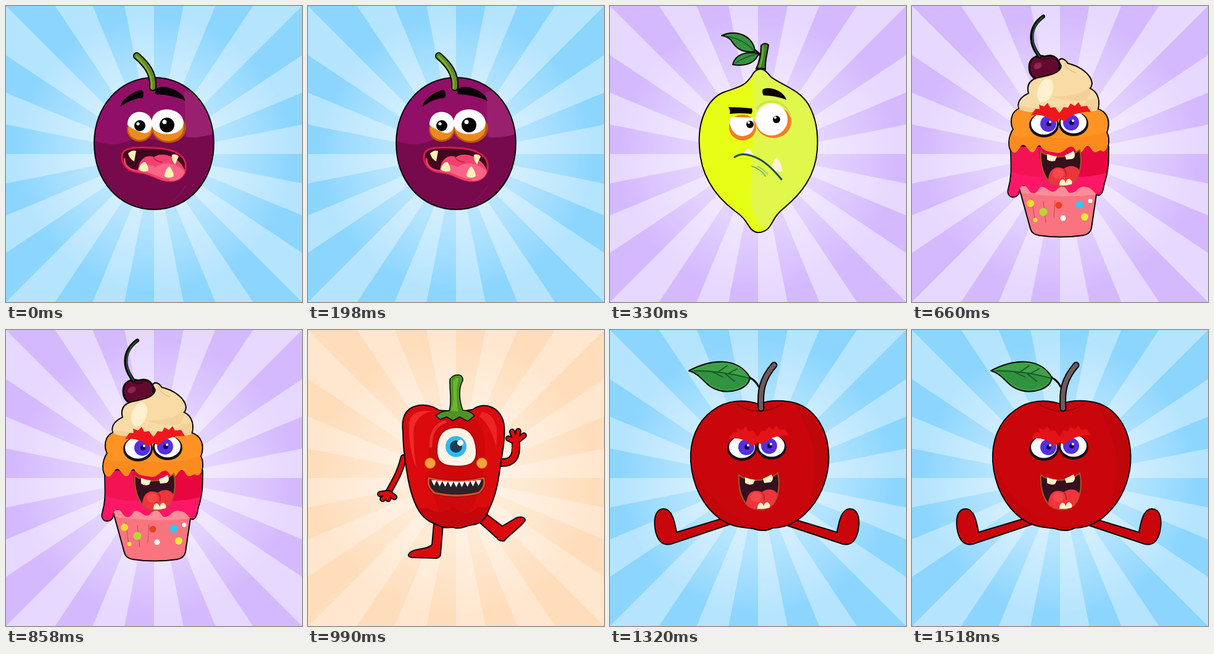
An HTML page for the animation above (1650 ms loop, 480 px wide and 480 px high).

```html
<!DOCTYPE html>
<html lang="en">
<head>
<meta charset="utf-8">
<title>Monster snacks</title>
<style>
  html, body { margin: 0; width: 100%; height: 100%; overflow: hidden; }
  svg { display: block; width: 100%; height: 100%; }
  .ink { stroke: #080406; stroke-width: 2; stroke-linejoin: round; stroke-linecap: round; }
</style>
</head>
<body>
<svg id="stage" viewBox="0 0 480 480"></svg>
<script>
const STEP = 330;
const stage = document.getElementById('stage');

const shape = (d, fill, extra = '') => `<path d="${d}" fill="${fill}" ${extra}/>`;
const inked = (d, fill, width = 2) => shape(d, fill, `class="ink" style="stroke-width:${width}"`);
const line = (d, color, width, cap = 'round') =>
  shape(d, 'none', `stroke="${color}" stroke-width="${width}" stroke-linecap="${cap}" stroke-linejoin="round"`);
const tube = (d, color, width, rim = 2) => line(d, '#080406', width + rim * 2) + line(d, color, width);
const oval = (x, y, rx, ry, fill, extra = '') =>
  `<ellipse cx="${x}" cy="${y}" rx="${rx}" ry="${ry}" fill="${fill}" ${extra}/>`;
const dot = (x, y, r, fill, extra) => oval(x, y, r, r, fill, extra);
const clipped = (id, d, content) =>
  `<clipPath id="${id}"><path d="${d}"/></clipPath><g clip-path="url(#${id})">${content}</g>`;

// Sixteen wedges, every second 11.25 degree sector
function wedges() {
  const point = i => {
    const a = i * Math.PI / 16;
    return `${240 + 400 * Math.cos(a)} ${240 + 400 * Math.sin(a)}`;
  };
  let d = '';
  for (let i = 0; i < 32; i += 2) d += `M240 240L${point(i)}L${point(i + 1)}Z`;
  return d;
}
const rays = wedges();
const backdrop = (dark, light) =>
  `<rect width="480" height="480" fill="${light}"/>${shape(rays, dark)}
   <rect width="480" height="480" fill="url(#glow)"/>`;
const blue = backdrop('#8bd5ff', '#b5e4ff');
const violet = backdrop('#d4b9ff', '#e7d8ff');
const peach = backdrop('#ffddba', '#ffe7cf');

function plum() {
  const body = 'M240 116C296 116 337 163 337 222C337 284 296 330 240 330C184 330 143 284 143 222C143 163 184 116 240 116Z';
  const mouth = 'M189 239C194 228 215 229 240 230C267 231 288 239 291 255C294 274 282 285 264 284C246 283 235 271 216 270C198 269 184 256 189 239Z';
  const shade = 'M140 217C172 230 196 225 215 208C246 224 274 218 288 212Q314 216 340 206V335H140Z';
  return shape(body, '#910f67')
    + clipped('plum', body,
        shape('M288 140C293 170 288 190 294 217Q320 217 340 207V130Z', '#99206f')
        + shape(shade, '#770a4c')
        + line('M268 318Q284 306 292 290', '#8d1760', 1))
    + inked(body, 'none')
    + tube('M238 132C240 109 227 94 212 81', '#5d8c20', 8)
    + line('M236 133C238 111 225 95 212 82', '#7fac2e', 3)
    + shape('M186 163C185 155 204 138 220 136Q225 141 222 149Q203 150 186 163Z', '#080406')
    + shape('M243 143C239 136 245 131 254 131C273 132 289 143 291 154Q270 144 243 143Z', '#080406')
    + oval(217, 200, 21, 20, '#b95611') + oval(264, 198, 28, 24, '#b95611')
    + oval(217, 199, 19, 18, '#ed8a1e') + oval(263, 197, 25, 22, '#ed8a1e')
    + shape('M197 193C196 165 236 165 237 191C237 203 229 207 222 206Q207 201 197 193Z', '#fff')
    + shape('M236 190C236 159 287 162 288 190C286 207 266 209 253 207C241 204 236 198 236 190Z', '#fff')
    + dot(217, 194, 9, '#050505') + dot(214, 191, 2.6, '#fff')
    + dot(261, 193, 12, '#050505') + dot(257, 188, 3.5, '#fff')
    + shape(mouth, '#42051f', 'stroke="#d01e48" stroke-width="3"')
    + clipped('gape', mouth,
        shape('M214 275C212 252 225 239 240 245C253 235 281 244 290 266V290H214Z', '#f3416f')
        + shape('M214 275C219 258 232 254 242 261C261 249 282 257 292 272V290H214Z', '#fb6587')
        + line('M239 246Q244 253 253 253', '#c91e50', 2))
    + line('M192 248C192 267 211 267 222 269C241 273 247 282 264 282', '#ef4069', 3)
    + shape('M198 239Q204 233 211 235L208 252Q200 248 198 239Z', '#fff1ba')
    + shape('M269 241Q277 239 280 244L274 257Q268 250 269 241Z', '#fff1ba')
    + shape('M215 265Q219 252 226 253Q231 259 231 267Q222 271 215 265Z', '#fff1ba')
    + shape('M257 276Q258 264 265 260Q272 268 272 276Q264 281 257 276Z', '#fff1ba');
}

function lemon() {
  const body = 'M240 103C247 100 253 105 261 115C276 127 307 135 322 160C334 181 338 208 336 234C333 276 310 304 284 326C263 342 264 355 255 362C246 369 236 369 229 362C222 354 221 345 202 332C165 304 147 270 145 229C142 188 157 151 184 140C209 131 218 131 230 113Q234 105 240 103Z';
  return shape(body, '#e7ff17')
    + clipped('lemon', body,
        shape('M231 100H345V330Q292 348 256 370C236 351 223 322 229 286Q236 205 231 100Z', '#e0f84c'))
    + inked(body, 'none')
    + inked('M237 102C242 91 245 80 245 64Q251 58 257 63C255 78 251 89 252 103Q244 99 237 102Z', '#417d28')
    + line('M248 66C249 80 245 91 243 99', '#67a63a', 3)
    + line('M243 79Q236 70 225 67M243 79Q234 79 226 80', '#080406', 3)
    + inked('M181 48C205 36 234 50 235 74C211 77 202 65 196 55Q190 49 181 48Z', '#35923e')
    + inked('M199 95C203 78 221 73 241 77C235 94 219 98 199 95Z', '#35923e')
    + line('M187 49Q216 53 234 73M204 92Q220 82 238 78', '#16572a', 1.3)
    + shape('M192 164Q211 164 230 166Q232 171 229 175Q210 173 194 175Q196 170 192 164Z', '#080406')
    + shape('M248 135C260 129 283 139 286 152Q267 145 249 145Q246 140 248 135Z', '#080406')
    + oval(215, 197, 22, 21, '#f47c20') + oval(265, 188, 29, 26, '#f47c20')
    + line('M239 166C251 149 282 150 292 176', '#cce04d', 3)
    + shape('M194 185Q194 180 200 180L231 181C238 197 231 211 213 211C201 209 194 199 194 185Z', '#fff')
    + oval(262, 184, 26, 26, '#fff')
    + dot(227, 192, 6, '#050505') + dot(225, 189, 2, '#fff')
    + dot(270, 184, 6, '#050505') + dot(268, 181, 2, '#fff')
    + shape('M216 241Q219 232 225 231Q232 237 234 246Q225 239 216 241Z', '#fff2d7')
    + shape('M262 263Q264 250 271 246Q279 256 279 268Q272 272 262 263Z', '#fff2d7')
    + line('M202 245Q211 239 222 241C243 245 259 258 278 281', '#174f50', 3)
    + line('M230 260Q244 264 252 276', '#5aab63', 1.5)
    + line('M239 260Q249 265 256 273', '#8fc557', 1.5);
}

function angryFace(brow) {
  const mouth = 'M209 236C222 247 254 249 272 233C276 250 274 272 264 284C252 296 231 294 221 283C211 270 208 253 209 236Z';
  const eye = (x, y, px) =>
    oval(x, y + 2, 24, 20, '#181018') + oval(x, y, 21, 17.5, '#fff')
    + dot(px, y, 13, '#5430e0') + dot(px + 1, y, 4, '#160846') + dot(px + 3, y - 3, 2, '#fff');
  return eye(214, 191, 221) + eye(262, 189, 258)
    + shape('M193 177L200 167L207 167L206 160L214 163L220 157L224 165L232 164L239 174L246 164L253 165L257 158L264 162L270 156L274 163L284 162L290 172Q265 170 247 187L239 183L231 189Q216 174 193 177Z', brow)
    + shape(mouth, '#36101d', 'stroke="#9d5a26" stroke-width="2"')
    + clipped('maw' + brow.slice(1), mouth,
        shape('M221 286C220 266 232 257 246 264C258 255 271 260 274 272L262 296H226Z', '#ee343c')
        + oval(237, 272, 9, 8, '#f4484c') + line('M247 265Q251 270 250 276', '#b71c38', 1.5))
    + shape('M219 240Q227 243 235 244L232 251Q224 253 219 249Z', '#fff4cd')
    + shape('M248 242Q256 239 262 235Q267 245 260 248L250 249Z', '#fff4cd')
    + shape('M239 291Q239 282 244 281Q250 282 249 291ZM249 291Q249 281 255 280Q261 283 259 289Z', '#fff4cd');
}

function sundae() {
  const cup = 'M174 292H300L290 360Q288 369 277 371Q241 376 206 371Q195 369 193 361Z';
  const berry = 'M161 228C161 255 164 274 157 297C153 311 171 313 173 301C175 289 184 287 190 299C196 307 203 303 207 294C217 289 222 304 232 300C243 287 249 293 254 302C265 306 268 293 277 293C288 292 293 298 298 304C307 311 309 298 311 287C318 267 318 249 318 228Z';
  const orange = 'M174 167C160 173 160 190 165 200C156 213 156 232 164 237C171 241 174 226 180 225C187 225 189 238 196 237C202 235 201 224 208 226C217 239 224 235 235 238C245 240 251 227 258 228C265 228 265 238 271 238C278 238 279 227 285 227C291 227 291 237 297 237C302 237 304 232 308 235C316 240 322 219 315 205C321 190 318 172 299 167Z';
  const cream = 'M239 89C242 84 249 88 252 94C271 98 290 111 291 126Q290 131 287 134C301 139 305 155 300 169C285 174 272 170 260 167C245 173 231 171 219 167C203 173 187 173 175 168C170 157 177 148 190 142C187 131 190 122 202 118C222 113 241 111 243 97Z';
  const cherry = 'M190 99C190 85 202 78 215 82C230 77 240 86 239 100C238 114 228 122 214 122C200 122 190 113 190 99Z';
  const sprinkles = [
    [192, 320, 6, '#f5dc35'], [213, 334, 6.5, '#b4d92f'], [238, 323, 5.5, '#e8421e'],
    [272, 322, 6.5, '#36c4f4'], [289, 316, 3.5, '#fff'], [200, 347, 3.5, '#f5e135'],
    [245, 344, 4.5, '#fff'], [280, 342, 6, '#f0ec35']
  ].map(s => dot(...s)).join('');
  return inked(cherry, '#63092f', 3)
    + oval(204, 97, 7, 5, '#8d2450', 'transform="rotate(-30 204 97)"')
    + line('M205 84Q214 90 224 84', '#390519', 2)
    + [cup, berry, orange, cream].map(d => inked(d, '#080406', 4)).join('')
    + shape(cup, '#fa747f')
    + clipped('cup', cup, shape('M174 292H300L298 306Q235 312 176 303Z', '#f98d98'))
    + line('M194 312L199 347M213 317L217 352M232 316L230 344', '#bc4859', 1)
    + sprinkles
    + shape(berry, '#e8063f')
    + clipped('berry', berry,
        shape('M154 225H205Q204 260 225 275Q275 282 320 270V315H154Z', '#f31354')
        + shape('M154 266Q190 282 225 275Q275 282 320 270V315H154Z', '#ff1767'))
    + shape(orange, '#ff9324')
    + clipped('orange', orange,
        shape('M157 207Q184 218 209 210Q258 222 322 203V244H157Z', '#fb8b1d'))
    + shape(cream, '#f9dba6')
    + clipped('cream', cream,
        shape('M297 120C282 142 257 149 224 146Q257 160 306 149V180H172V161Q199 169 220 161Q251 168 281 158Z', '#f4d199')
        + oval(216, 137, 12, 20, '#fff0ce', 'transform="rotate(18 216 137)"'))
    + line('M247 92Q251 104 265 108', '#dcae71', 1)
    + line('M207 82C187 57 192 32 213 17', '#080406', 6)
    + line('M207 82C189 57 194 33 212 18', '#22512d', 2.5)
    + angryFace('#f0171c');
}

function pepper() {
  const red = '#da0a0d';
  const body = 'M240 132C228 130 222 132 212 130C201 122 187 120 176 123C157 127 151 144 154 166C154 190 157 210 160 228C164 255 170 281 184 299C195 313 208 314 216 319C226 323 232 318 239 321C250 323 256 317 266 316C280 315 288 307 293 292C305 268 309 244 312 219C316 195 320 173 318 155C315 126 286 114 267 129Q253 132 240 132Z';
  const mouth = 'M196 240Q240 251 285 240Q289 253 277 264Q240 273 205 264Q192 253 196 240Z';
  let teeth = '';
  for (let i = 0; i < 9; i++) {
    const sag = 243 + 3 * Math.sin((i + .5) * Math.PI / 9);
    teeth += `M${200 + i * 9} ${sag}h9l-4.5 9Z`;
  }
  return tube('M155 207C150 229 142 242 131 262', red, 7)
    + tube('M130 264L117 266M129 267L121 274M131 267L130 274M132 265L140 271', red, 6)
    + tube('M312 215C332 216 339 206 337 182', red, 10)
    + tube('M336 181L325 176M336 179L331 165M338 179L341 164M338 181L350 171', red, 6)
    + line('M336 196L337 180', red, 10)
    + inked('M204 315L201 348C194 357 168 353 163 364Q162 369 171 369L209 370Q215 369 215 362L219 315Z', red)
    + inked('M276 310L306 337Q310 343 318 342C328 330 347 318 352 309C353 303 344 302 337 305L315 318L290 299Z', red)
    + shape(body, red)
    + clipped('pepper', body,
        shape('M196 198C194 154 214 137 240 139C268 137 287 153 287 188C289 229 279 264 264 294Q259 311 250 322H226C207 286 196 245 196 198Z', '#cf080b')
        + shape('M160 274Q178 294 195 288Q214 304 236 287Q256 307 276 287Q293 291 310 270V325H160Z', '#c3070a')
        + shape('M164 154C164 134 182 129 200 132Q175 137 171 163Q171 199 176 224Q163 193 164 154Z', '#f02a2b')
        + shape('M282 133C303 135 310 158 305 190Q297 155 278 140Z', '#ec2425')
        + line('M199 188Q199 156 222 149', '#ed2a2d', 5))
    + inked(body, 'none')
    + inked('M207 139Q218 130 229 131C234 114 229 97 230 80Q236 71 246 73Q252 76 251 82C243 96 246 116 251 130Q264 131 270 139L259 148L246 141L235 147L225 141L214 145Z', '#4f9324', 1.5)
    + shape('M232 131C239 111 234 95 236 82Q239 77 245 78C238 99 243 118 243 132Z', '#6bb52f')
    + shape('M209 193C210 167 222 158 241 158C260 158 271 169 273 195C274 215 265 221 242 221C217 221 208 214 209 193Z', '#fff4e5', 'stroke="#9c1011" stroke-width="2"')
    + dot(240, 189, 17, '#32b9ee') + dot(240, 189, 10, '#163f58') + dot(247, 183, 5, '#fff')
    + dot(198, 216, 8.5, '#f8a23a', 'stroke="#cb6d20" stroke-width="1"')
    + dot(282, 216, 8.5, '#f8a23a', 'stroke="#cb6d20" stroke-width="1"')
    + shape(mouth, '#2d2029', 'stroke="#7d0a0c" stroke-width="5"')
    + shape(mouth, '#2d2029', 'stroke="#e04a22" stroke-width="3"')
    + clipped('grin', mouth, shape(teeth, '#fff'));
}

function apple() {
  const red = '#c9060c';
  const body = 'M241 120C218 112 190 113 167 130C140 149 129 181 131 214C134 254 152 287 178 306C201 323 222 319 235 323Q250 328 264 321C294 321 316 302 332 280C350 253 357 222 354 194C350 154 327 121 289 116Q263 112 241 120Z';
  const leg = 'M191 303L108 328C105 312 101 290 87 290C73 290 70 308 74 327C78 344 87 350 99 347L195 315Z';
  return inked(leg, red)
    + `<g transform="matrix(-1 0 0 1 476 0)">${inked(leg, red)}</g>`
    + shape(body, red)
    + clipped('apple', body,
        shape('M300 118Q341 146 354 196Q355 254 320 293Q340 229 325 174Z', '#be060b')
        + shape('M137 221Q161 289 236 318Q288 326 331 281V330H130Z', '#c3060b')
        + line('M207 121Q242 143 279 120', '#8c080c', 2))
    + inked(body, 'none')
    + tube('M245 127C243 100 246 80 266 57', '#6d5a60', 7)
    + line('M241 92Q235 79 221 75', '#080406', 3)
    + inked('M128 66C165 46 208 44 227 77C224 97 195 103 177 98C153 92 151 73 128 66Z', '#3fa045')
    + shape('M132 66Q174 65 225 78C219 94 194 99 179 95C155 89 154 73 132 66Z', '#319240')
    + line('M137 66Q181 66 225 78M175 68L190 58M193 70L206 63M166 68L183 76M187 71L202 83', '#145926', 1.8)
    + `<g transform="translate(0 -1)">${angryFace('#e31318')}</g>`;
}

const scenes = [blue + plum(), violet + lemon(), violet + sundae(), peach + pepper(), blue + apple()];
stage.innerHTML = `<defs><radialGradient id="glow" gradientUnits="userSpaceOnUse" cx="240" cy="240" r="225">
  <stop offset="0" stop-color="#fff" stop-opacity=".55"/>
  <stop offset=".5" stop-color="#fff" stop-opacity=".36"/>
  <stop offset=".85" stop-color="#fff" stop-opacity=".12"/>
  <stop offset="1" stop-color="#fff" stop-opacity="0"/>
</radialGradient></defs>` + scenes.map(s => `<g visibility="hidden">${s}</g>`).join('');

const groups = [...stage.children].slice(1);
const start = performance.now();
function draw() {
  const current = Math.floor((performance.now() - start) / STEP) % groups.length;
  groups.forEach((g, i) => g.setAttribute('visibility', i === current ? 'visible' : 'hidden'));
  requestAnimationFrame(draw);
}
draw();
</script>
</body>
</html>
```
